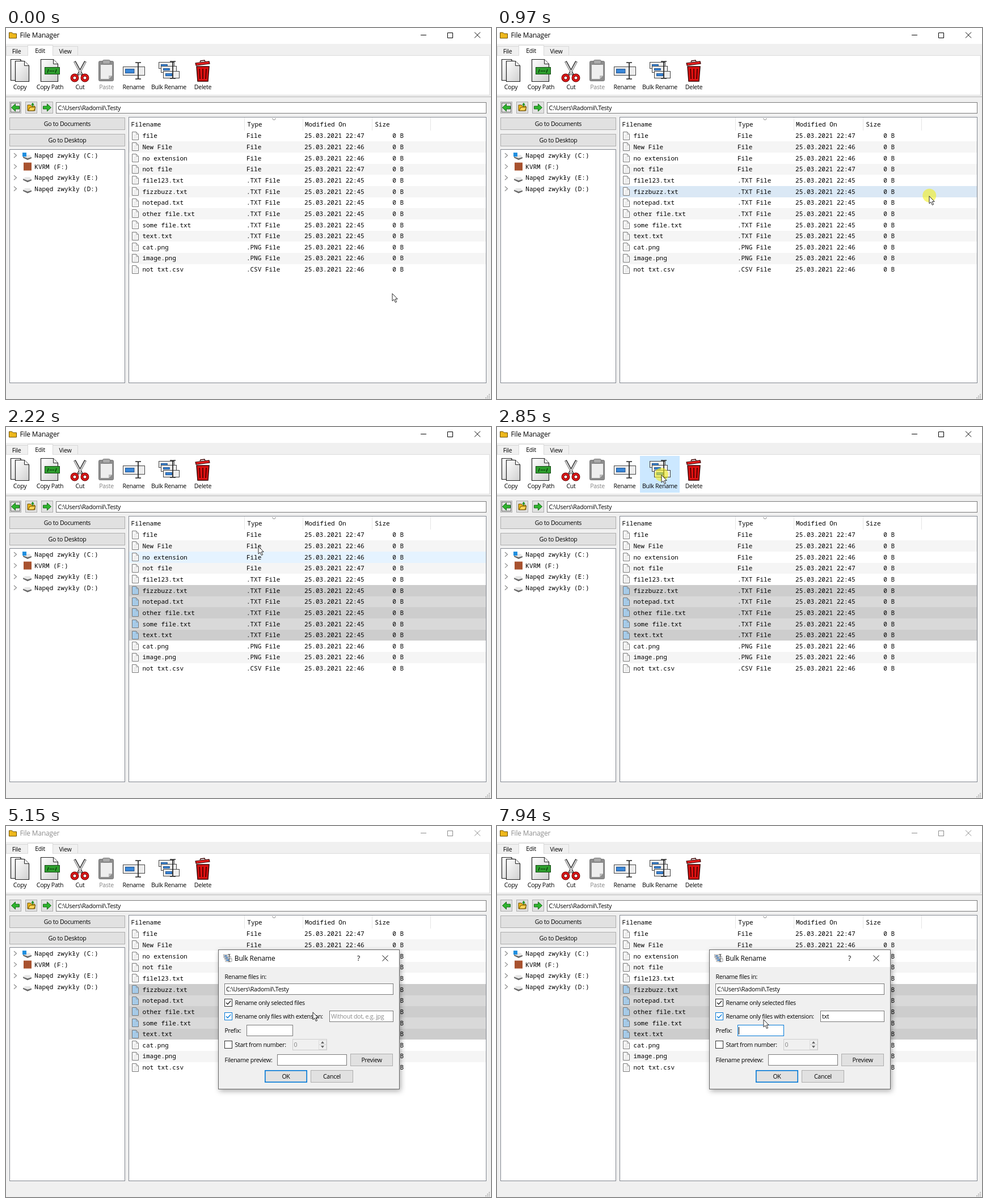
An HTML page that plays this animation: 855x655 px, repeating every 8 s.

```html
<!DOCTYPE html>
<html lang="en">
<head>
<meta charset="utf-8">
<title>File Manager</title>
<style>
html, body { margin: 0; width: 100%; height: 100%; overflow: hidden; background: #f0f0f0; }
svg { display: block; }
text { font: 10.6px "Open Sans", sans-serif; letter-spacing: -.28px; white-space: pre; }
text.title { font-size: 11.9px; letter-spacing: -.12px; }
text.mono { font: 11px "Noto Sans Mono", monospace; letter-spacing: 0; }
</style>
</head>
<body>
<svg id="stage" width="855" height="655" viewBox="0 0 855 655"></svg>
<script>
const LOOP = 8000, STEP = 60;
const PATH = 'C:\\Users\\Radomil\\.Testy';
const ROW_TOP = 180.8, ROW_H = 19.65;
const BLUE = '#0078d7', GREY = '#7a7a7a';

const FILES = [
  ['file', 'File', 47], ['New File', 'File', 46], ['no extension', 'File', 46], ['not file', 'File', 47],
  ['file123.txt', '.TXT File', 45], ['fizzbuzz.txt', '.TXT File', 45], ['notepad.txt', '.TXT File', 45],
  ['other file.txt', '.TXT File', 45], ['some file.txt', '.TXT File', 45], ['text.txt', '.TXT File', 45],
  ['cat.png', '.PNG File', 46], ['image.png', '.PNG File', 46], ['not txt.csv', '.CSV File', 46]
];

// Pointer positions: time, x, y
const KEYS = [
  [-10, 681, 468], [230, 705, 430], [500, 750, 345], [830, 764, 291],
  [910, 764, 291], [1150, 757, 310], [1390, 746, 347], [1600, 740, 363],
  [1980, 740, 363], [2100, 640, 295], [2160, 505, 236], [2220, 445, 210], [2400, 350, 130], [2760, 290, 84],
  [3090, 290, 84], [3270, 360, 150], [3450, 450, 240], [3570, 486, 277], [3630, 482, 299],
  [3840, 440, 326], [4050, 414, 312], [4110, 412, 309],
  [4480, 412, 309], [4660, 424, 331], [4970, 424, 331], [5090, 500, 330], [5150, 541, 328],
  [5390, 609, 332], [6580, 609, 332], [6640, 608, 333],
  [6890, 608, 333], [7070, 570, 340], [7310, 480, 358], [7430, 468, 363],
  [7700, 468, 363], [7940, 470, 341], [8000, 470, 341]
];
const STARTS = [50, 970, 2040, 2850, 3690, 4300, 5150, 6640, 6950, 7760];
const CLICKS = [[970, 1850], [2850, 2970], [4300, 4420], [4780, 4900], [5460, 5580], [7510, 7690]];

// Markup helpers
const box = (x, y, w, h, fill, stroke, extra = '') => stroke
  ? `<rect x="${x + .5}" y="${y + .5}" width="${w - 1}" height="${h - 1}" fill="${fill}" stroke="${stroke}" ${extra}/>`
  : `<rect x="${x}" y="${y}" width="${w}" height="${h}" fill="${fill}" ${extra}/>`;
const text = (x, y, s, extra = '') => `<text x="${x}" y="${y}" ${extra}>${s}</text>`;
const mono = (x, y, s) => text(x, y, s, 'class="mono"');
const mid = (x, y, s, extra = '') => text(x, y, s, 'text-anchor="middle" ' + extra);
const line = (d, stroke, w = 1, fill = 'none') => `<path d="${d}" fill="${fill}" stroke="${stroke}" stroke-width="${w}"/>`;
const group = (x, y, s, extra = '') => `<g transform="translate(${x} ${y})" ${extra}>${s}</g>`;
const button = (x, y, w, h, label) => box(x, y, w, h, '#e1e1e1', '#adadad') + mid(x + w / 2, y + h / 2 + 4, label);
const cross = (x, y) => `M${x - 5} ${y - 5}l10 10m0-10l-10 10`;

// Icons
const page = (x, y, w, h) =>
  line(`M${x} ${y}h${w - 8}l8 8v${h - 8}h${-w}z`, '#222', 1.2, 'url(#paper)') +
  line(`M${x + w - 8} ${y}v8h8`, '#222', 1, '#f4f4f4');
const folder = line('M1 12V2h5l2 2h6v8z', '#6b4c00', 1, '#eeb81c');
const beam = (x, y, h) => line(`M${x - 5} ${y}h4l1 1 1-1h4M${x} ${y + 1}v${h}M${x - 5} ${y + h + 2}h4l1-1 1 1h4`, '#222', 1.7);
const field = (x, y, w, h) => box(x, y, w, h, '#eee', '#444') + box(x + 4, y + 4, w * .42, h - 8, '#3a87d8', '#1d4f8c');
const bulk = field(0, 2, 28, 12) + field(4, 9, 28, 12) + field(8, 18, 29, 13) + beam(25, 1, 28);
const arrow = (dir, x) => `<path transform="translate(${x} 140.5) scale(${dir} 1)" d="M-7.5 0l7-6.5v4h7v5h-7v4z" fill="#2fb52f" stroke="#146b14"/>`;
const drive = '<path d="M0 3l4-3h8l3 4-7 2z" fill="#e6e6e6"/><path d="M0 3l8 3 7-2v2l-7 3-8-4z" fill="#666"/>';
const scissors =
  line('M121 59l13 24M140 59l-13 24', '#333', 4) + line('M121 60l12 22M140 60l-12 22', '#ddd', 2) +
  '<g fill="none" stroke="#6d0000" stroke-width="5"><circle cx="121" cy="88" r="5"/><circle cx="139" cy="88" r="5"/></g>' +
  '<g fill="none" stroke="#e01818" stroke-width="3"><circle cx="121" cy="88" r="5"/><circle cx="139" cy="88" r="5"/></g>';
const clipboard = box(163, 58, 27, 36, '#8d8d8d', '#777', 'rx="2"') + '<path d="M167 65h20v19l-6 6h-14z" fill="#eee"/>' +
  '<path d="M181 90v-6h6z" fill="#bbb"/>' + box(170, 56, 14, 8, '#aaa', '#777', 'rx="2"');
const bin = line('M336 68h22l-2 26h-18z', '#3a0000', 1.5, '#dd1111') +
  line('M341 72l1 18M347 72v18M353 72l-1 18', '#5a0000', 2) +
  line('M334 62l24-3 1 4-24 3z', '#3a0000', 1.2, '#ee2020') + line('M342 60l1-2 7-1 1 2', '#3a0000', 1.5);

function ribbon() {
  const names = [['Copy', 24.5], ['Copy Path', 77.5], ['Cut', 130.5], ['Paste', 177], ['Rename', 225], ['Bulk Rename', 287], ['Delete', 347]];
  return box(0, 0, 855, 28, '#fff') + group(4.5, 6, folder) +
    `<g id="caption">${text(24.5, 17, 'File Manager', 'class="title"')}` +
    line(`M731 12.5h10M778.5 8.5h9v9h-9z${cross(831, 12.5)}`, '#000') + '</g>' +
    box(0, 32, 39, 17, '#f0f0f0', '#d9d9d9') + box(82, 32, 45, 17, '#f0f0f0', '#d9d9d9') +
    box(-1, 48, 854, 71, '#fff', '#dcdcdc') + box(38, 30, 45, 19, '#fff', '#d9d9d9') + box(39, 47, 43, 3, '#fff') +
    mid(18.5, 44.5, 'File') + mid(60, 44, 'Edit') + mid(104.5, 44.5, 'View') +
    box(0, 121, 855, 1, '#b4b4b4') +
    box(252, 51, 70, 65, '#e5f3ff', '#cce8ff', 'id="tool"') +
    page(8.5, 55.5, 25, 37) + page(16.5, 58.5, 24, 36) +
    page(61.5, 55.5, 30, 39) + box(68, 69, 27, 13, '#2f9e2f', '#124a12') + line('M73 79l2-6M77 76h2m1 0h2m1 0h2M87 79l2-6', '#062f06', 1.3) +
    scissors + clipboard + field(206, 68, 39, 16) + beam(233, 61, 27) + group(269, 58, bulk) + bin +
    names.map(([s, x]) => mid(x, 108, s, s == 'Paste' ? 'fill="#838383"' : '')).join('');
}

function sidebar() {
  const items = ['Napęd zwykły (C:)', 'KVRM (F:)', 'Napęd zwykły (E:)', 'Napęd zwykły (D:)'];
  return [6, 34, 62].map(x => box(x, 130, 21, 21, '#e1e1e1', '#adadad')).join('') +
    box(8, 132, 17, 17, 'none', '#000', 'id="focus" stroke-dasharray="1 1"') +
    arrow(1, 17) + arrow(-1, 72) + group(37, 134, folder) +
    line('M39 146l3-6h10l-3 6z', '#6b4c00', 1, '#ffd75a') + line('M47 139v-5m-2 2l2-3 2 3', '#1d8f1d', 1.5) +
    box(88, 131, 759, 20, '#fff', GREY) + text(91.5, 145, PATH) +
    button(6, 158, 204, 22, 'Go to Documents') + button(6, 187, 204, 22, 'Go to Desktop') +
    box(6, 214, 204, 413, '#fff', '#828790') +
    items.map((s, i) => {
      const y = 225 + i * 19.6;
      const icon = i == 1 ? box(31, y - 7, 14, 14, '#a8522f')
        : group(30, y - 1, drive) + (i ? '' : box(29, 220, 7, 7, '#1f8fe0'));
      return line(`M14 ${y - 4}l4.5 4-4.5 4`, '#8a8a8a', 1.2) + icon + mono(50.3, y + 4, s);
    }).join('');
}

function table() {
  const heads = [['Filename', 220.6], ['Type', 425.3], ['Modified On', 526.9], ['Size', 650.2]];
  return box(216, 157, 631, 470, '#fff', '#828790') +
    heads.map(([s, x]) => mono(x, 173.5, s)).join('') +
    [420, 523, 645, 748].map(x => box(x, 158, 1, 23, '#e5e5e5')).join('') +
    line('M469 159.5l3.5 3 3.5-3', '#777') +
    FILES.map(([name, type, min], i) => {
      const y = Math.round(ROW_TOP + i * ROW_H), b = ROW_TOP + i * ROW_H + 13.5;
      return box(217, y, 629, 20, '#fff', '', 'class="row"') +
        `<path class="doc" d="M222.5 ${y + 2.5}h7l4 4v10h-11z" fill="#fafafa" stroke="#777"/>` +
        line(`M229.5 ${y + 2.5}v4h4`, '#888', .8) + line(`M225 ${y + 8.5}h6m-6 2.5h6m-6 2.5h6`, '#bbb', .5) +
        mono(240.4, b, name) + mono(423.9, b, type) + mono(526.1, b, `25.03.2021 22:${min}`) + mono(681.2, b, '0 B');
    }).join('') + '<rect id="band" fill="#0066cc" fill-opacity=".3" stroke="#1467b3"/>';
}

function dialog() {
  const check = (y, label, i) => box(385, y, 14, 14, '#fff', '#333', `id="box${i}"`) +
    `<path id="tick${i}" d="M388 ${y + 7}l2.8 2.8 5.4-6" fill="none" stroke="#222" stroke-width="1.3"/>` + text(403.5, y + 11, label);
  return '<g id="dialog">' + box(374, 218, 320, 247, '#f0f0f0', '', 'filter="url(#shadow)"') +
    box(374, 218, 320, 247, '#f0f0f0', '#666') + box(375, 219, 318, 30, '#fff') +
    `<g transform="translate(383.5 226) scale(.4 .44)">${bulk}</g>` +
    text(402.8, 238, 'Bulk Rename', 'class="title"') + mid(621.5, 238, '?', 'class="title"') + line(cross(668.5, 233.5), '#000') +
    text(385.5, 270, 'Rename files in:') + box(385, 278, 298, 20, '#fff', GREY) + text(388, 292, PATH) +
    check(305, 'Rename only selected files', 1) + check(329, 'Rename only files with extension:', 2) +
    box(570, 326, 113, 20, '#fff', GREY, 'id="ext"') + text(573, 340, '', 'id="extText"') +
    text(385.5, 365, 'Prefix:') + box(424, 351, 82, 20, '#fff', GREY, 'id="prefix"') +
    check(379, 'Start from number:', 3) + box(505, 376, 61, 20, '#f0f0f0', '#ccc') + text(507.5, 390, '0', 'fill="#838383"') +
    box(551, 378, 14, 8, '#f0f0f0', '#ddd') + box(551, 386, 14, 9, '#f0f0f0', '#ddd') +
    '<path d="M555 384l3-4 3 4zM555 388l3 4 3-4z" fill="#666"/>' +
    text(385.5, 417, 'Filename preview:') + box(478, 403, 123, 20, '#fff', GREY) +
    button(607, 402, 75, 22, 'Preview') + button(456, 431, 75, 22, 'OK') +
    `<rect x="456.8" y="431.8" width="73.4" height="20.4" fill="none" stroke="${BLUE}" stroke-width="1.6"/>` + button(537, 431, 75, 22, 'Cancel') +
    box(0, 0, 1, 13, '#000', '', 'id="caret"') + '</g>';
}

const stage = document.getElementById('stage');
stage.innerHTML = `<defs>
  <linearGradient id="paper" x2="1" y2="1"><stop stop-color="#fff"/><stop offset="1" stop-color="#cfcfcf"/></linearGradient>
  <filter id="shadow" x="-10%" y="-10%" width="120%" height="125%"><feDropShadow dx="2" dy="3" stdDeviation="5" flood-opacity=".33"/></filter>
  </defs>` + box(0, 0, 855, 655, '#f0f0f0') + ribbon() + sidebar() + table() +
  [[851, 646], [848, 649], [851, 649], [845, 652], [848, 652], [851, 652]].map(([x, y]) => box(x, y, 2, 2, '#bbb')).join('') +
  dialog() + '<circle id="click" r="12" fill="#f2ee1e" fill-opacity=".6"/>' +
  group(0, 0, '<path id="arrow" d="M0 .8v13.2l3-2.8 2.4 5.3 2.2-1-2.4-5.1h4z" fill="#fff" stroke="#111" stroke-width=".9"/>' +
    '<path id="ibeam" d="M-3.5-8.5h3l.5.5.5-.5h3M0-8v16M-3.5 8.5h3l.5-.5.5.5h3" fill="none" stroke="#111"/>', 'id="pointer"');

const $ = id => document.getElementById(id);
const rows = [...document.querySelectorAll('.row')], docs = [...document.querySelectorAll('.doc')];
const show = (id, on) => $(id).setAttribute('visibility', on ? 'inherit' : 'hidden');
const set = (id, attrs) => { for (const k in attrs) $(id).setAttribute(k, attrs[k]); };
const inside = ([x, y], l, t, r, b) => x >= l && x <= r && y >= t && y <= b;
const during = (t, a, b) => t >= a && t < b;

function pointerAt(t) {
  const i = Math.max(1, KEYS.findIndex(k => k[0] >= t));
  const [a, b] = [KEYS[i - 1], KEYS[i]], p = (t - a[0]) / (b[0] - a[0]);
  return [a[1] + (b[1] - a[1]) * p, a[2] + (b[2] - a[2]) * p];
}
const rowAt = p => inside(p, 217, 181, 846, 436) ? Math.floor((p[1] - ROW_TOP) / ROW_H) : -1;

function drawRows(t, q, pos) {
  const drag = during(t, 970, 1850);
  const last = t < 1030 ? -1 : t < 1850 ? rowAt(pos) : 9;
  const hover = t >= 3030 ? -1 : rowAt(drag ? pos : pointerAt(Math.max(0, q - STEP)));
  rows.forEach((row, i) => {
    const picked = i >= 5 && i <= last, hot = i == hover;
    const fill = picked ? (hot ? '#cce8ff' : i % 2 ? '#cdcdcd' : '#d9d9d9')
      : hot ? (drag ? '#dae8f5' : '#e5f3ff') : i % 2 ? '#f5f5f5' : '#fff';
    row.setAttribute('fill', fill);
    row.setAttribute('stroke', picked && hot ? '#99d1ff' : 'none');
    docs[i].setAttribute('fill', picked ? '#a3cdef' : '#fafafa');
  });
  show('band', during(t, 1030, 1850));
  set('band', { x: pos[0] - .5, y: 290, width: Math.max(0, 764 - pos[0]), height: Math.max(0, pos[1] - 291) });
}

function drawDialog(t, pos) {
  const open = t >= 3030;
  set('caption', { opacity: open ? .45 : 1 });
  show('focus', !open);
  show('dialog', open);
  set('dialog', { opacity: Math.min(1, Math.max(0, (t - 3000) / 120)) });
  if (!open) return false;

  const overExt = inside(pos, 570, 326, 682, 345), overPrefix = inside(pos, 424, 351, 506, 371);
  const enabled = t >= 4900, extFocus = during(t, 5550, 7510), prefixFocus = t >= 7510;
  const hot = [inside(pos, 385, 303, 529, 321), inside(pos, 385, 327, 561, 345), false];
  const ticked = [t >= 4420, enabled, false];
  hot.forEach((on, i) => {
    set('box' + (i + 1), { stroke: on ? BLUE : '#333' });
    set('tick' + (i + 1), { stroke: on ? BLUE : '#222' });
    show('tick' + (i + 1), ticked[i]);
  });
  const border = (focus, over) => focus ? BLUE : over ? '#171717' : GREY;
  set('ext', { fill: enabled ? '#fff' : '#f0f0f0', stroke: enabled ? border(extFocus, overExt) : '#ccc' });
  set('prefix', { stroke: border(prefixFocus, overPrefix) });

  const typed = 'txt'.slice(0, [6150, 6400, 6520].filter(k => t >= k).length);
  $('extText').textContent = typed || 'Without dot, e.g. jpg';
  set('extText', { fill: typed ? '#000' : '#8a8a8a' });
  const caretX = typed ? 573 + Math.round($('extText').getComputedTextLength()) : 573;
  set('caret', prefixFocus ? { x: 426, y: 355 } : { x: caretX, y: 329 });
  show('caret', prefixFocus || during(t, 5550, 6080) || during(t, 6150, 7510));
  return enabled && overExt || overPrefix;
}

function draw(t) {
  const start = STARTS.filter(s => s <= t).pop() || 0;
  const q = start + Math.floor((t - start) / STEP) * STEP;
  const pos = pointerAt(t < STARTS[0] ? KEYS[0][0] : q);
  drawRows(t, q, pos);
  show('tool', t < 3030 && inside(pos, 252, 51, 322, 115));
  set('tool', { fill: during(t, 2850, 2970) ? '#cce8ff' : '#e5f3ff' });
  const beamOn = drawDialog(t, pos);
  show('arrow', !beamOn);
  show('ibeam', beamOn);
  set('pointer', { transform: `translate(${Math.round(pos[0])} ${Math.round(pos[1])})` });
  set('click', { cx: pos[0], cy: pos[1] });
  show('click', CLICKS.some(([a, b]) => during(t, a, b)));
}

const origin = performance.now();
function tick() {
  draw((performance.now() - origin) % LOOP);
  requestAnimationFrame(tick);
}
tick();
</script>
</body>
</html>
```
